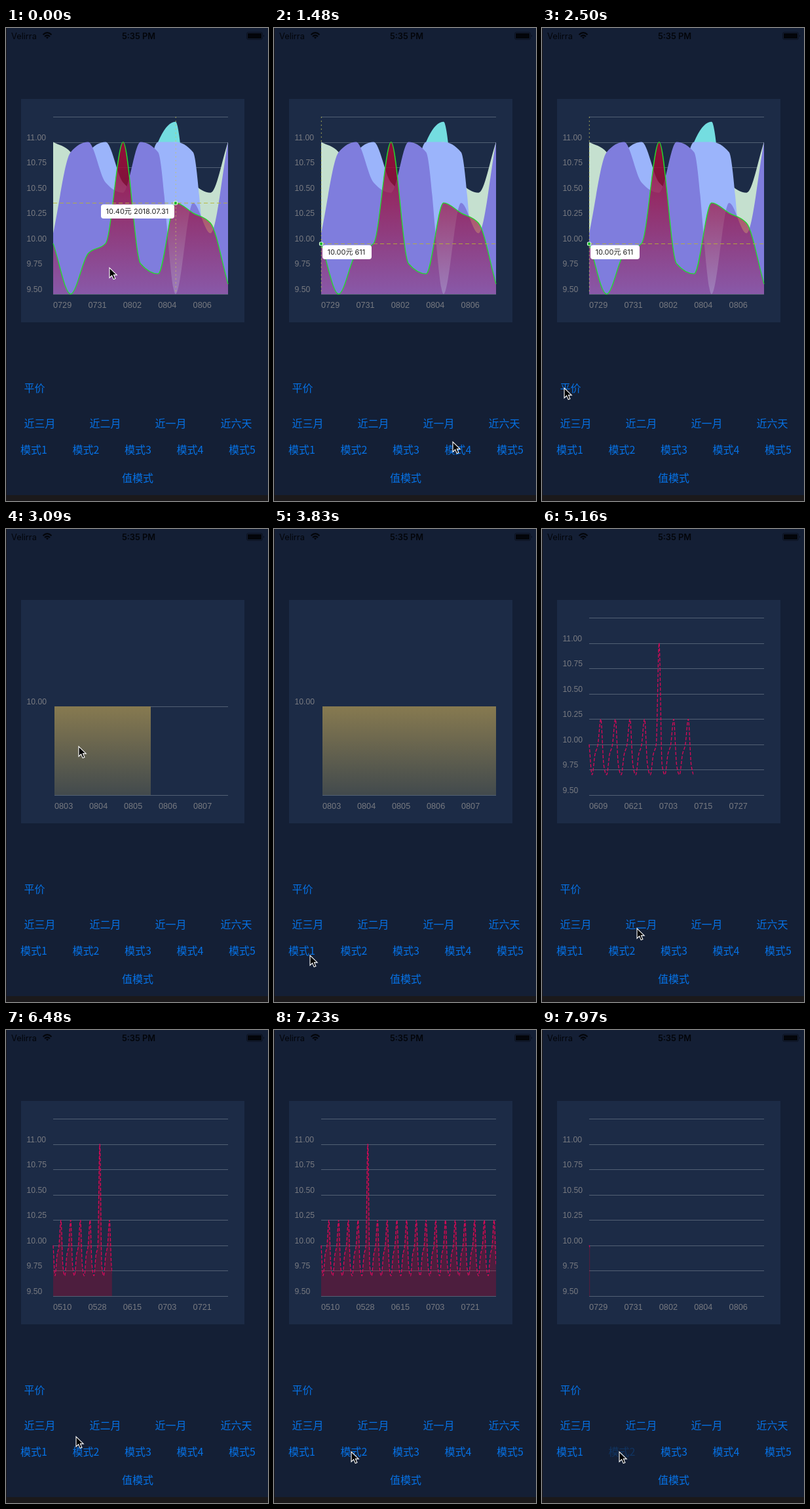
An HTML page that plays this animation: 400 px wide and 720 px high, repeating every 8000 ms.

```html
<!DOCTYPE html>
<html lang="zh">
<head>
<meta charset="utf-8">
<style>
  html, body { margin: 0; width: 100%; height: 100%; overflow: hidden; background: #141f35; }
  svg { display: block; width: 400px; height: 720px; }
  text { white-space: pre; }
  .axis { font: 12.2px "Liberation Sans", sans-serif; fill: #787a80; }
  .date { font-size: 12.7px; }
  .btn { font: 16px "Noto Sans CJK SC", "Noto Sans CJK", sans-serif; fill: #0672e6; }
  .bar { font: 12.8px Inter, sans-serif; fill: #03050a; }
  .tip { font: 11px Inter, "Noto Sans CJK SC", "Noto Sans CJK", sans-serif; fill: #222; }
  .grid { stroke: #526074; }
</style>
</head>
<body>
<svg viewBox="0 0 400 720">
  <defs>
    <linearGradient id="red" gradientUnits="userSpaceOnUse" x1="0" y1="174" x2="0" y2="405">
      <stop stop-color="#9c0c38" stop-opacity=".95"/>
      <stop offset="1" stop-color="#9c0c38" stop-opacity=".32"/>
    </linearGradient>
    <linearGradient id="gold" x2="0" y2="1">
      <stop stop-color="#877a50"/>
      <stop offset="1" stop-color="#424a4d"/>
    </linearGradient>
    <clipPath id="reveal"><rect id="wipe" x="71" y="130" height="280"/></clipPath>
  </defs>
  <rect width="400" height="720" fill="#1b191b"/>
  <rect x="1" width="399" height="711" fill="#141f35"/>
  <text class="bar" x="8" y="16.5">Velirra</text>
  <g fill="none" stroke="#03050a" stroke-width="2">
    <path d="M56.5 10.2Q63 4 69.5 10.2M59 13Q63 9.2 67 13"/>
    <path d="M61 14.2L63 16.6 65 14.2Q63 12.8 61 14.2Z" fill="#03050a" stroke="none"/>
  </g>
  <text class="bar" x="202.5" y="16.5" text-anchor="middle" style="font-weight:600">5:35 PM</text>
  <rect x="367.5" y="6.5" width="24" height="11" rx="2.5" fill="none" stroke="#03050a" stroke-opacity=".5"/>
  <rect x="369" y="8" width="21" height="8" rx="1" fill="#03050a"/>
  <path d="M393 10v4q1.5-2 0-4" fill="#03050a"/>
  <rect x="23" y="108" width="341" height="340" fill="#1c2b46"/>
  <g id="charts"></g>
  <g id="cross">
    <path id="vline" stroke="#c9c85a" stroke-opacity=".75" stroke-dasharray="2 4"/>
    <path id="hline" stroke="#b9b42e" stroke-opacity=".85" stroke-dasharray="6 4"/>
    <rect id="dot" width="5" height="5" rx="1.2" fill="#16b52a" stroke="#dfffdc" stroke-width="1.2"/>
    <rect id="bubble" height="21.5" rx="4" fill="#fff"/>
    <text id="tip" class="tip"></text>
  </g>
  <g id="buttons"></g>
  <path id="cursor" d="M0 0V15.2L3.6 11.8 6.2 17.6 8.9 16.4 6.4 10.9H11.2Z" fill="#000" stroke="#fff" stroke-width="1.1"/>
</svg>
<script>
const LEFT = 72, RIGHT = 339, BASE = 405, STEP = 147.6, LOOP = 8000;
const $ = id => document.getElementById(id);
const set = (id, attrs) => { for (const k in attrs) $(id).setAttribute(k, attrs[k]); };
const height = price => BASE - (price - 9.5) * 154.28;
const list = (n, f) => Array.from({ length: n }, (_, i) => f(i));

// Monotone cubic through evenly spaced prices
function curve(values) {
  const ys = values.map(height), last = ys.length - 1, h = (RIGHT - LEFT) / last;
  const slope = i => {
    const a = ys[i] - ys[i - 1], b = ys[i + 1] - ys[i];
    if (i === 0) return b;
    if (i === last) return a;
    return (Math.sign(a) + Math.sign(b)) * Math.min(Math.abs(a), Math.abs(b), Math.abs(a + b) / 4);
  };
  let d = `M${LEFT} ${ys[0]}`;
  for (let i = 0; i < last; i++) {
    const x = LEFT + i * h;
    d += `C${x + h / 3} ${ys[i] + slope(i) / 3} ${x + 2 * h / 3} ${ys[i + 1] - slope(i + 1) / 3} ${x + h} ${ys[i + 1]}`;
  }
  return d;
}
const area = (values, fill) => `<path d="${curve(values)}V${BASE}H${LEFT}Z" fill="${fill}"/>`;
const line = (values, color, dash) =>
  `<path d="${curve(values)}" fill="none" stroke="${color}" stroke-width="1.3" stroke-dasharray="${dash}"/>`;
const text = (cls, x, y, s) => `<text class="${cls}" x="${x}" y="${y}">${s}</text>`;
const rule = (y, x = LEFT) => `<path class="grid" d="M${x} ${y}H${RIGHT}"/>`;
const row = (cls, names, x, gap, y) => names.split(' ').map((s, i) => text(cls, x + i * gap, y, s)).join('');
const dates = (names, x = LEFT, gap = 53.4) => row('axis date', names, x, gap, 425.5);
const wiped = s => `<g clip-path="url(#reveal)">${s}</g>`;

const grid = list(8, i => {
  const price = 9.5 + i / 4, y = height(price);
  return rule(Math.round(y) + .5) + (i < 7 ? text('axis', 31.5, y - 3, price.toFixed(2)) : '');
}).join('');

// Five-day pattern with a single spike
const prices = days => list(days + 1, i => i === 0 ? 10 : i === 24 ? 11 : [9.8, 9.7, 9.9, 10, 10.25][i % 5]);
const dashed = days => line(prices(days), '#dc0858', '5 2.5');

const main = [10, 9.5, 9.9, 10, 11, 9.8, 9.7, 10.4, 10.3, 10.2, 9.6];
const wave = [10.1, 10.9, 11, 10.6, 10.5, 11, 10.9, 9.5, 10.4, 10.1, 11];
const stacked =
  area(list(11, i => ({ 6: 11, 7: 11.2 })[i] || 10), '#74dde0') +
  area(list(11, i => wave[(i + 5) % 10]), '#c5e0cf') +
  area([10, ...wave.slice(0, 6), 11, 10.9, 9.5, 9.5], '#9bb4fb') +
  area(wave, '#7f7ddd') + area(main, 'url(#red)') + line(main, '#22dd2c', 'none');

// Start is counted in steps of the clock
const tint = 'rgba(190,0,45,.3)', tenDays = '0729 0731 0802 0804 0806';
const charts = [
  { start: -9, body: grid + stacked + dates(tenDays) },
  { start: 17.22, body: rule(270.5, 74) + rule(405.5, 74) + text('axis', 31.5, 266.8, '10.00') +
      wiped('<rect x="74" y="270" width="265" height="135" fill="url(#gold)"/>') +
      dates('0803 0804 0805 0806 0807', 74, 53) },
  { start: 30.96, body: grid + wiped(dashed(60)) + dates('0609 0621 0703 0715 0727') },
  { start: 41.72, body: grid + wiped(area(prices(90), tint) + dashed(90)) + dates('0510 0528 0615 0703 0721') },
  { start: 53.97, body: grid + wiped(area(prices(10), tint) + dashed(10)) + dates(tenDays) }
];
$('charts').innerHTML = charts.map(c => `<g>${c.body}</g>`).join('');

$('buttons').innerHTML = row('btn', '平价', 27.5, 0, 554) +
  row('btn', '近三月 近二月 近一月 近六天', 27.5, 100, 607.5) +
  row('btn', '模式1 模式2 模式3 模式4 模式5', 22, 79.5, 648) + row('btn', '值模式', 177, 0, 690.5);

// Step at which each button is pressed
const presses = { '平价': 16, '近二月': 30, '近三月': 41, '模式2': 54 };

// Pointer stops: [step, x, y]
const stops = [
  [0, 158, 365], [4, 80, 345], [8, 271, 518], [10, 273, 630], [11, 273, 655], [13, 270, 652],
  [15, 15, 560], [17, 34, 548], [21, 111, 331], [26, 55, 649], [28, 135, 612], [30, 145, 608],
  [35, 145, 608], [38, 47, 619], [42, 48, 618], [44, 107, 619], [48, 118, 642], [55, 118, 642]
];
function pointer(k) {
  const i = stops.findIndex(s => s[0] > k), [k0, x0, y0] = stops[i - 1], [k1, x1, y1] = stops[i];
  const f = (k - k0) / (k1 - k0);
  return [x0 + (x1 - x0) * f, y0 + (y1 - y0) * f];
}

function crosshair(day, bubbleX, width, label) {
  const x = LEFT + day * 26.7, y = Math.round(height(main[day]));
  set('vline', { d: `M${x + .3} 135V${BASE}` });
  set('hline', { d: `M${LEFT} ${y + .5}H${RIGHT}` });
  set('dot', { x: x - 2.5, y: y - 2 });
  set('bubble', { x: bubbleX, y: y + 2.5, width });
  set('tip', { x: bubbleX + 7.5, y: y + 17 });
  $('tip').textContent = label;
}

function draw(time) {
  // The picture advances in discrete steps
  const k = Math.floor((time % LOOP + 20) / STEP);
  const shown = charts.findLastIndex(c => c.start <= k);
  [...$('charts').children].forEach((g, i) => g.style.display = i === shown ? '' : 'none');
  set('wipe', { width: 1 + 267 * Math.min(1, (k - charts[shown].start) * STEP / 1000) });
  $('cross').style.display = shown ? 'none' : '';
  if (k < 4) crosshair(7, 145, 112, '10.40元 2018.07.31');
  else crosshair(0, 74, 75, '10.00元 611');
  for (const b of $('buttons').children) b.style.opacity = presses[b.textContent] === k ? .25 : 1;
  set('cursor', { transform: `translate(${pointer(k)})` });
}

const began = performance.now();
function tick() {
  draw(performance.now() - began);
  requestAnimationFrame(tick);
}
tick();
</script>
</body>
</html>
```
